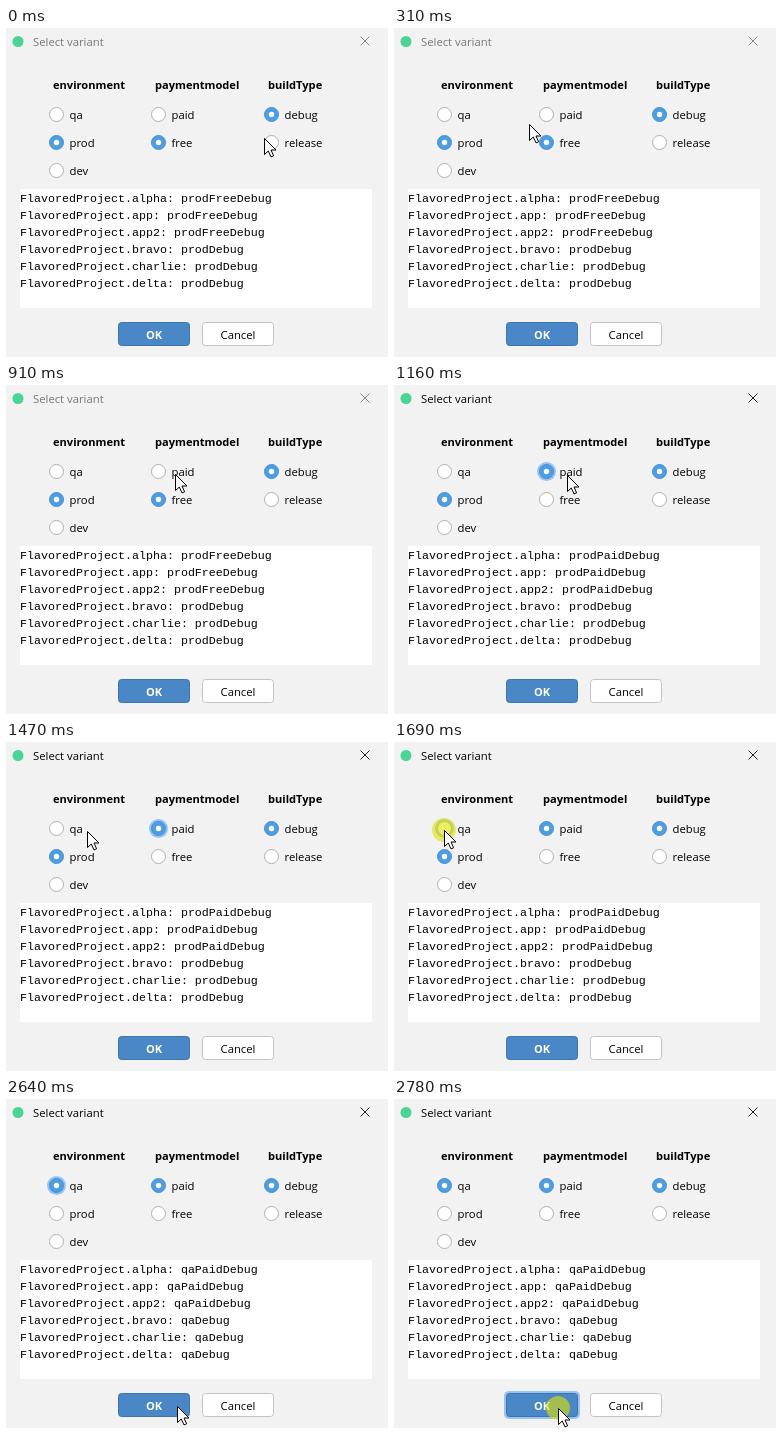
These frames come from a looping animation (382 px wide and 329 px high, 2.95 s). An HTML page:

```html
<!DOCTYPE html>
<html lang="en">
<head>
<meta charset="utf-8">
<title>Select variant</title>
<style>
  html, body { margin: 0; width: 100%; height: 100%; overflow: hidden; background: #f2f2f2; }
  svg { display: block; width: 382px; height: 329px; }
  text { font: 11.3px "Open Sans", "Noto Sans", sans-serif; fill: #000; white-space: pre; }
  .bold { font-weight: 700; font-size: 11.1px; }
  .mono { font: 11.667px "Liberation Mono", "Courier New", monospace; }
  .focus { fill: #97c3f3; }
</style>
</head>
<body>
<svg id="stage" viewBox="0 0 382 329">
  <rect width="382" height="329" fill="#f2f2f2"/>
  <circle cx="12" cy="13.5" r="5.5" fill="#48d597"/>
  <text id="title" x="27" y="18">Select variant</text>
  <path id="close" d="M354.5 8.5l9 9m0-9l-9 9" fill="none"/>
  <g id="options"></g>
  <rect x="14" y="161" width="352" height="119" fill="#fff"/>
  <g id="modules"></g>
  <rect id="okFocus" class="focus" x="110" y="292" width="76" height="28" rx="5"/>
  <rect x="112.5" y="294.5" width="71" height="23" rx="3" fill="#4a87c7" stroke="#3b75b3"/>
  <text class="bold" x="148" y="311" text-anchor="middle" style="fill:#fff">OK</text>
  <rect x="196.5" y="294.5" width="71" height="23" rx="3" fill="#fff" stroke="#c3c3c3"/>
  <text x="232" y="311" text-anchor="middle">Cancel</text>
  <g id="pointer">
    <circle id="press" r="12" fill="#e1e100" opacity=".6"/>
    <path d="M.5 .5V16.5L4.3 13L7 18.9L9.6 17.8L7 12H12Z" fill="#fff" stroke="#000"/>
  </g>
</svg>
<script>
const LOOP = 2950;
const byId = id => document.getElementById(id);

function add(parent, tag, attrs, text = '') {
  const node = document.createElementNS('http://www.w3.org/2000/svg', tag);
  for (const key in attrs) node.setAttribute(key, attrs[key]);
  node.textContent = text;
  parent.append(node);
  return node;
}

const show = (node, visible) => node.setAttribute('visibility', visible ? 'visible' : 'hidden');

const columns = [
  { name: 'environment', x: 50.5, titleX: 47, options: ['qa', 'prod', 'dev'] },
  { name: 'paymentmodel', x: 152.5, titleX: 149, options: ['paid', 'free'] },
  { name: 'buildType', x: 265.5, titleX: 262, options: ['debug', 'release'] },
];
const radios = {};
for (const { name, x, titleX, options } of columns) {
  add(byId('options'), 'text', { x: titleX, y: 61, class: 'bold' }, name);
  options.forEach((option, row) => {
    const cy = 86.5 + row * 28;
    const circle = attrs => add(byId('options'), 'circle', { cx: x, cy, ...attrs });
    radios[option] = {
      ring: circle({ r: 9.5, class: 'focus' }),
      body: circle({ r: 7 }),
      dot: circle({ r: 2.7, fill: '#fff' }),
    };
    add(byId('options'), 'text', { x: x + 13, y: cy + 4.5 }, option);
  });
}

const modules = ['alpha', 'app', 'app2', 'bravo', 'charlie', 'delta'].map((name, row) => ({
  name,
  paymentAware: name.startsWith('a'),
  line: add(byId('modules'), 'text', { x: 14, y: 174 + row * 17, class: 'mono' }),
}));

// Pointer moves: quadratic curves sampled in a number of discrete steps.
const smooth = p => p * p * (3 - 2 * p);
const moves = [
  { start: 70, end: 530, steps: 7, path: [[258, 110], [150, 96], [64, 91]], ease: smooth },
  { start: 610, end: 920, steps: 5, path: [[64, 91], [121, 77], [173, 90]], ease: p => 1 - (1 - p) ** 2 },
  { start: 1240, end: 1620, steps: 6, path: [[173, 90], [110, 91], [50, 88]], ease: smooth },
  { start: 2260, end: 2710, steps: 7, path: [[50, 88], [260, 289], [164, 309]], ease: p => smooth(p ** .85) },
];

function pointerAt(t) {
  const { start, end, steps, path, ease } = moves.findLast(m => t >= m.start) || moves[0];
  const gap = (end - start) / (steps - 1);
  const step = Math.floor((t - start + 4) / gap) + 1;
  const u = ease(Math.max(0, Math.min(1, step / steps)));
  const [from, via, to] = path;
  return from.map((a, i) =>
    Math.round((1 - u) ** 2 * a + 2 * u * (1 - u) * via[i] + u * u * to[i]));
}

const within = (t, from, to) => t >= from && t < to;
const capital = word => word[0].toUpperCase() + word.slice(1);

function render(t) {
  const environment = t < 2090 ? 'prod' : 'qa';
  const payment = t < 1160 ? 'free' : 'paid';
  const focused = within(t, 990, 1690) ? 'paid' : within(t, 1690, 2780) ? 'qa' : '';
  const selected = [environment, payment, 'debug'];

  for (const option in radios) {
    const { ring, body, dot } = radios[option];
    const on = selected.includes(option);
    show(ring, option === focused);
    show(dot, on);
    body.setAttribute('fill', on ? '#4d9de3' : '#fff');
    body.setAttribute('stroke', on ? '#4590d6' : option === focused ? '#7aa9dc' : '#b0b0b0');
  }
  for (const { name, paymentAware, line } of modules) {
    line.textContent =
      `FlavoredProject.${name}: ${environment}${paymentAware ? capital(payment) : ''}Debug`;
  }

  const active = t >= 990;
  byId('title').style.fill = active ? '#000' : '#777';
  byId('close').setAttribute('stroke', active ? '#222' : '#888');
  show(byId('okFocus'), t >= 2780);
  show(byId('press'), within(t, 990, 1160) || within(t, 1690, 2090) || t >= 2780);
  byId('pointer').setAttribute('transform', `translate(${pointerAt(t)})`);
}

const began = performance.now();
function frame() {
  render((performance.now() - began) % LOOP);
  requestAnimationFrame(frame);
}
frame();
</script>
</body>
</html>
```
